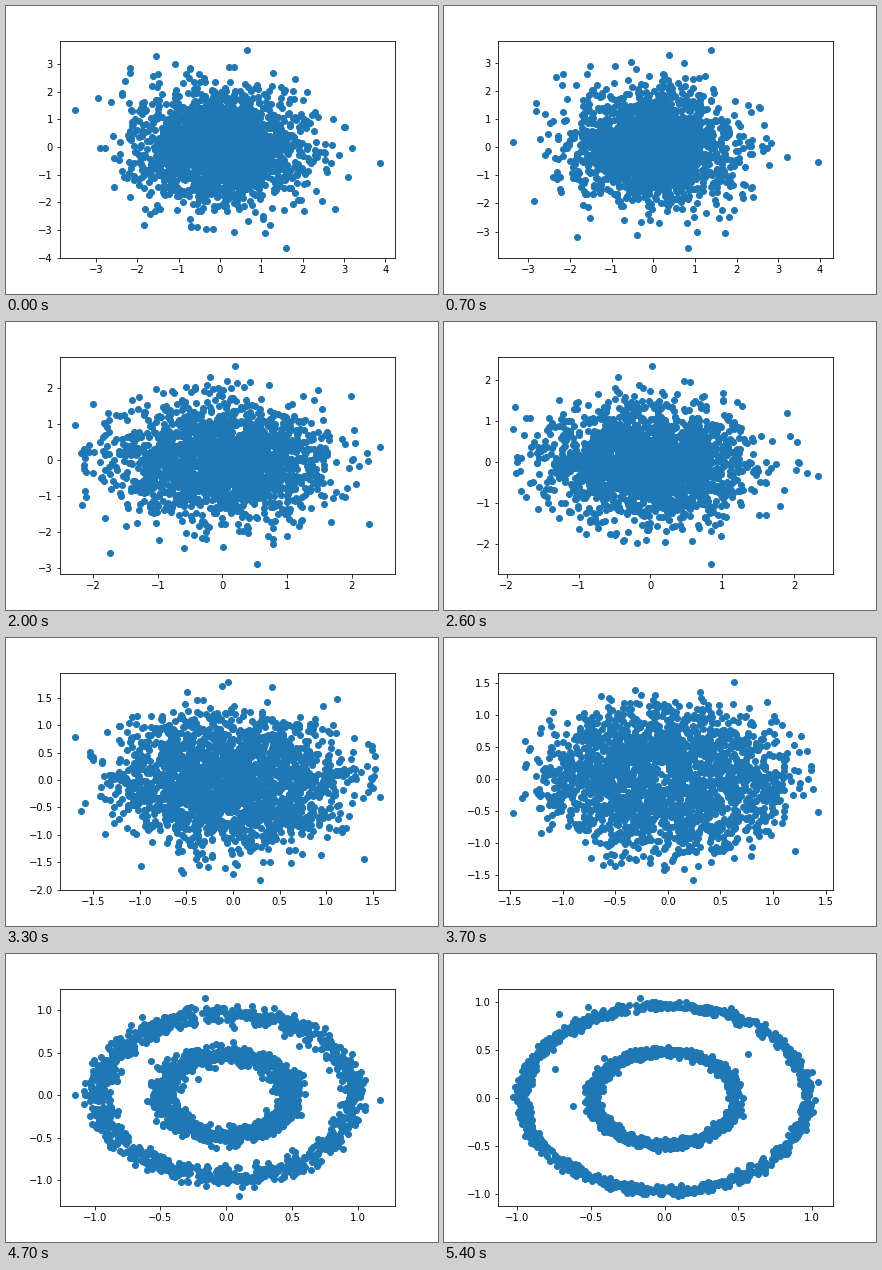
A matplotlib script that plays this animation: 432x288 px, repeating every 5500 ms.

```python
import numpy as np
import matplotlib.pyplot as plt
from matplotlib.animation import FuncAnimation

FRAMES, STEP_MS = 55, 100
POINTS, STRAGGLERS = 2000, 14
MEMORY = 0.975  # how much of its noise a point keeps per step

# How far the cloud extends on each side at a few steps.
KEYS = [0, 7, 15, 26, 33, 41, 54]
LEFT = [-3.50, -3.36, -2.59, -1.91, -1.69, -1.254, -1.025]
RIGHT = [3.86, 3.94, 2.52, 2.328, 1.571, 1.278, 1.037]
LOW = [-3.66, -3.59, -3.24, -2.49, -1.823, -1.335, -1.022]
HIGH = [3.495, 3.43, 2.85, 2.33, 1.778, 1.225, 1.0375]

rng = np.random.default_rng(8)
steps = np.arange(FRAMES)
low_edge = np.column_stack([np.interp(steps, KEYS, e) for e in (LEFT, LOW)])
high_edge = np.column_stack([np.interp(steps, KEYS, e) for e in (RIGHT, HIGH)])


def two_rings():
    angle = rng.uniform(0, 2 * np.pi, POINTS)
    radius = np.where(np.arange(POINTS) % 2, 0.485, 0.968)
    return radius[:, None] * np.column_stack([np.cos(angle), np.sin(angle)])


def noise_walk():
    """Unit Gaussian noise that drifts from step to step."""
    walk = [rng.normal(size=(POINTS, 2))]
    for _ in steps[1:]:
        kick = rng.normal(size=(POINTS, 2))
        walk.append(MEMORY * walk[-1] + np.sqrt(1 - MEMORY**2) * kick)
    return walk


rings = two_rings()
walk = noise_walk()
inset = rng.uniform(0, 0.25, (POINTS, 1))
# Noise left at the end; a few stragglers never quite settle.
floor = np.where(np.arange(POINTS) < STRAGGLERS, 0.1, 0.025)[:, None]


def cloud(i):
    fade = np.cos(np.pi / 2 * i / (FRAMES - 1)) ** 2.2
    level = floor + (1 - floor) * fade
    pts = np.sqrt(1 - level**2) * rings + level * walk[i]

    # Pull points that overshoot an edge back inside.
    edge = np.where(pts < 0, low_edge[i], high_edge[i])
    over = (pts / edge).max(axis=1, keepdims=True)
    pts = np.where(over > 0.99, pts / over * (0.99 - level * inset), pts)

    # The outermost point on each side touches the edge.
    for axis in range(2):
        pts[pts[:, axis].argmin(), axis] = low_edge[i, axis]
        pts[pts[:, axis].argmax(), axis] = high_edge[i, axis]
    return pts


def padded(low, high):
    pad = 0.05 * (high - low)
    return low - pad, high + pad


fig, ax = plt.subplots(figsize=(6, 4), dpi=72)
fig.subplots_adjust(left=0.125, right=0.9, bottom=0.125, top=0.88)
dots = ax.scatter(*cloud(0).T, color="#1f77b4")


def draw(i):
    dots.set_offsets(cloud(i))
    ax.set_xlim(padded(low_edge[i, 0], high_edge[i, 0]))
    ax.set_ylim(padded(low_edge[i, 1], high_edge[i, 1]))
    return [dots]


anim = FuncAnimation(fig, draw, frames=FRAMES, interval=STEP_MS,
                     repeat=True, repeat_delay=0)
plt.show()
```
